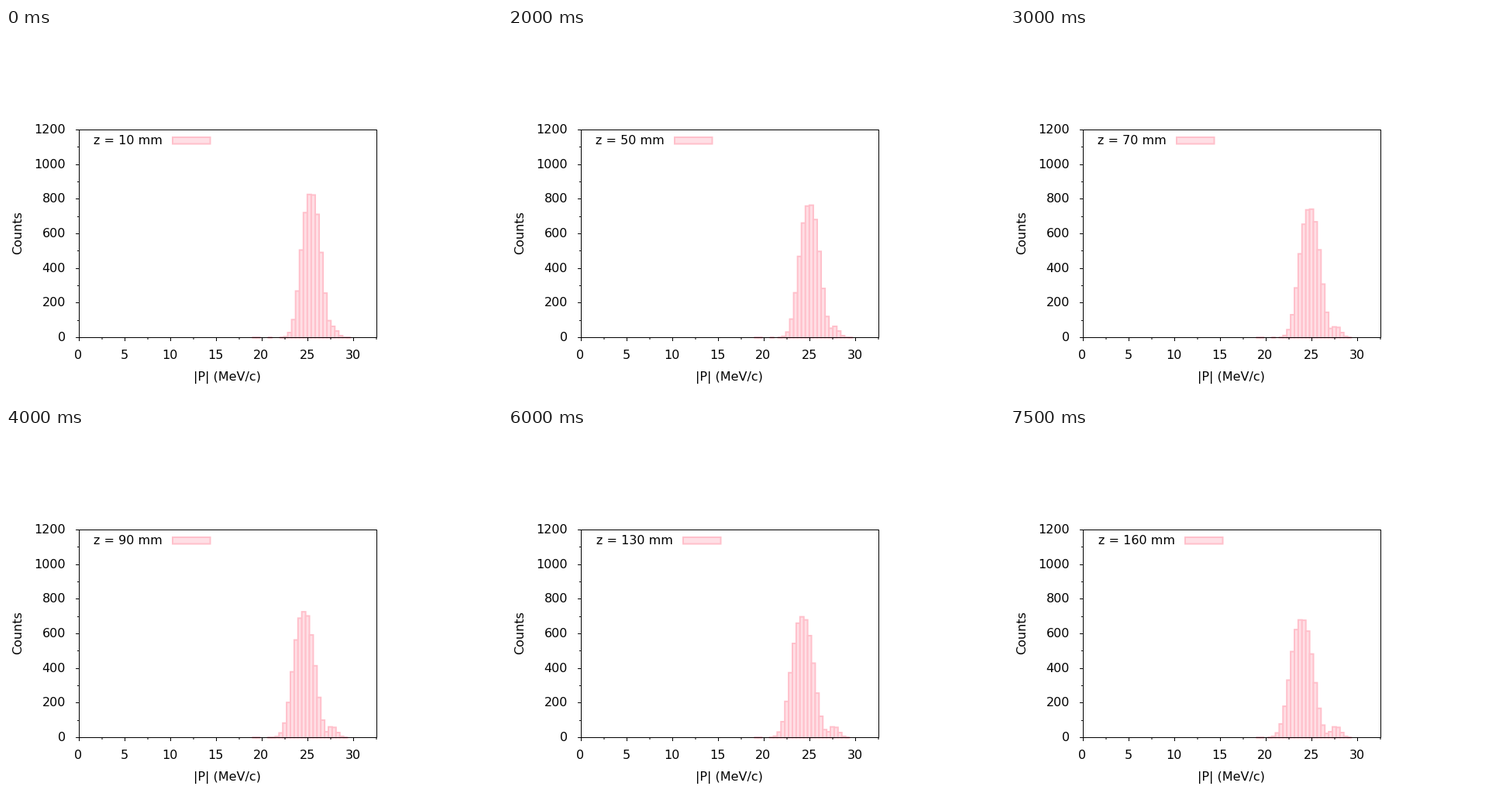
These frames come from a looping animation (640 by 480 pixels, 8000 ms). A matplotlib script:

```python
from math import floor

import numpy as np
import matplotlib.pyplot as plt
from matplotlib.animation import FuncAnimation
from matplotlib.patches import Rectangle

W, H, DPI = 640, 480, 100
PX = 72 / DPI                      # points per pixel
LEFT, RIGHT, TOP, BASE = 94.5, 478.5, 131.5, 399.5
X_UNIT, Y_UNIT = 11.8, (BASE - TOP) / 1200
BIN_X0, N_BINS = 318.0, 25
STRAYS = [0, 1, 4, N_BINS - 1]     # bins that always hold a lone particle
EDGE, FILL = "#ffc0cb", "#ffdfe5"

plt.rcParams["font.family"] = "DejaVu Sans"
plt.rcParams["font.size"] = 16 * PX


def bin_width(z):
    return 5.06 if z < 70 else 4.9


def bell(x, centre, width, power):
    return np.exp(-np.abs((x - centre) / width) ** power)


def histogram(z):
    """Counts per bin at depth z: a slowing, widening beam plus a fixed bump."""
    x = BIN_X0 + bin_width(z) * (np.arange(N_BINS) + 0.5)
    height = 640 + 215 * np.exp(-z / 100)
    beam = height * bell(x, 394.9 - 0.1145 * z, 16.5 + 0.018 * z, 2.4)
    bump = 66 * bell(x, 420.5, 8.5, 2)
    counts = np.round(np.maximum(beam, bump))
    counts[STRAYS] = np.maximum(counts[STRAYS], 1)
    return counts


fig = plt.figure(figsize=(W / DPI, H / DPI), dpi=DPI, facecolor="white")
ax = fig.add_axes([0, 0, 1, 1])
ax.set(xlim=(0, W), ylim=(H, 0))
ax.axis("off")


def line(xs, ys):
    ax.plot(xs, ys, color="black", lw=PX, zorder=3, snap=False,
            solid_capstyle="butt")


def box(x=0, y=0, w=0, h=0, fill=FILL, edge=EDGE, lw=2, z=2):
    return ax.add_patch(Rectangle((x, y), w, h, fc=fill, ec=edge, lw=lw * PX,
                                  joinstyle="miter", snap=False, zorder=z))


def text(x, y, s="", ha="center", **kw):
    return ax.text(x, y, s, ha=ha, va="baseline", **kw)


box(LEFT, TOP, RIGHT - LEFT, BASE - TOP, fill="none", edge="black", lw=1, z=3)

for n in range(0, 1201, 100):
    y = BASE - n * Y_UNIT
    row = floor(y) + 0.5           # keep the ticks on whole pixels
    major = n % 200 == 0
    line([LEFT - (4.5 if major else 2.5), LEFT], [row, row])
    if major:
        text(77, floor(y + 4.9), str(n), ha="right")

for n in range(14):
    x = LEFT + n * 2.5 * X_UNIT
    major = n % 2 == 0
    line([x, x], [BASE, BASE + (4.5 if major else 2.5)])
    if major:
        text(x - 1, 427, str(n * 5 // 2))

text(285.5, 455, "|P| (MeV/c)")
text(20, 264.5, "Counts", rotation=90, rotation_mode="anchor")

label = text(202, 150, ha="right")
swatch = box(215, 141, 48.5, 8.5)
bars = [box() for _ in range(N_BINS)]


def update(i):
    z = 10 * (i + 1)
    shift = 11 if z >= 100 else 0  # room for the third digit
    label.set_text(f"z = {z} mm")
    label.set_x(202 + shift)
    swatch.set_x(215 + shift)
    w = bin_width(z)
    for k, (bar, n) in enumerate(zip(bars, histogram(z))):
        bar.set_bounds(BIN_X0 + k * w, BASE - n * Y_UNIT, w, n * Y_UNIT)
        bar.set_visible(n > 0)
    return [label, swatch, *bars]


anim = FuncAnimation(fig, update, frames=16, interval=500, repeat=True,
                     repeat_delay=0, blit=False)
plt.show()
```
